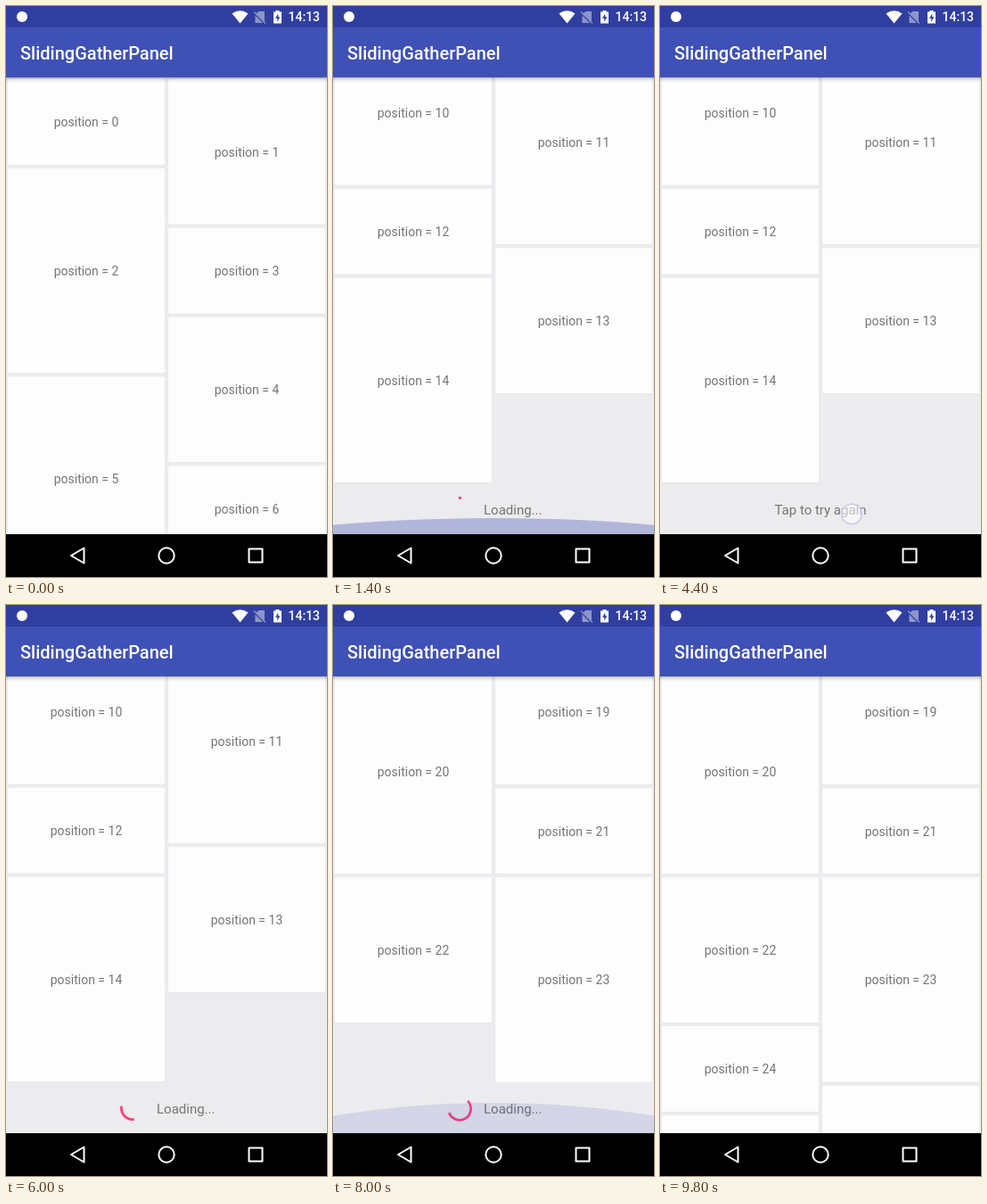
Write an HTML page that moves like this. It is 360 px wide and 640 px high and loops after 9900 ms.

```html
<!DOCTYPE html>
<html lang="en">
<head>
<meta charset="utf-8">
<title>Paged list</title>
<style>
  html, body { margin: 0; width: 100%; height: 100%; overflow: hidden; background: #000; }
  svg { display: block; width: 100%; height: 100%; }
  text { font-family: Roboto, sans-serif; font-size: 14px; fill: #757575; }
  .mid { text-anchor: middle; }
  .foot { font-size: 15px; }
  .title { font-size: 20px; font-weight: 500; fill: #fff; }
  .clock { font-weight: 500; fill: #fff; }
  .nav { fill: none; stroke: #fff; stroke-width: 2; stroke-linejoin: round; }
</style>
</head>
<body>
<svg viewBox="0 0 360 640">
  <defs>
    <linearGradient id="shade" x2="0" y2="1">
      <stop offset="0" stop-color="#000" stop-opacity=".27"/>
      <stop offset=".4" stop-color="#000" stop-opacity=".09"/>
      <stop offset="1" stop-color="#000" stop-opacity="0"/>
    </linearGradient>
  </defs>
  <rect width="360" height="640" fill="#ecebee"/>

  <g id="list">
    <g id="footer">
      <g id="busy">
        <path id="arc" fill="none" stroke="#ff4081" stroke-width="2.8" stroke-linecap="square"/>
        <text class="foot" x="169" y="33.6">Loading...</text>
      </g>
      <text id="retry" class="foot mid" x="180" y="33.6">Tap to try again</text>
    </g>
  </g>

  <g id="glow"><circle cx="180" cy="-467.7" r="540" fill="#3f51b5"/></g>

  <rect y="80" width="360" height="6" fill="url(#shade)"/>
  <rect width="360" height="80" fill="#3f51b5"/>
  <rect width="360" height="24" fill="#303f9f"/>
  <text class="title" x="16" y="59.5">SlidingGatherPanel</text>

  <circle cx="18" cy="12" r="6" fill="#fff"/>
  <path d="M253.5 8.4Q262.5 2.2 271.5 8.4L262.5 19.4Z" fill="#fff"/>
  <g opacity=".45">
    <path d="M283.5 6H290V17.5L280.5 8.5ZM279.5 10.5L288 19H279.5Z" fill="#fff"/>
    <path d="M278 6.5L291 19.5" stroke="#fff" stroke-width="1.3"/>
  </g>
  <path d="M302.5 5H306.500V6.400H309V19.500H300V6.400H302.500Z" fill="#fff"/>
  <path d="M305.300 8.500L302 13.800H304.200V17.700L307.400 12.300H305.300Z" fill="#303f9f"/>
  <text class="clock" x="316.500" y="17.200">14:13</text>

  <rect y="592" width="360" height="48"/>
  <path class="nav" d="M73 616L87.500 607.500V624.500Z"/>
  <circle class="nav" cx="180" cy="616" r="8.700"/>
  <rect class="nav" x="272.500" y="608.500" width="15" height="15"/>

  <circle id="touch" r="11.300" fill="#fff" fill-opacity=".55" stroke="#cfc9e8" stroke-width="1.600"/>
</svg>
<script>
const LOOP = 9900, STEP = 100;
const LOADED = [-1000, 6400, 9200];       // when each page of cards arrives
const FIRST = [0, 15, 24, 28];            // first card of each page
const END = [1380, 6340 / 3];             // footer tops in list space
const SCROLL = [
  [900, 0], [1000, 20], [1100, 110], [1200, 370], [1300, 630], [1376, 844],
  [7200, 844], [7300, 868], [7400, 952], [7500, 1165], [7600, 1385], [7700, 1576.67]
];
const SPINS = [[1395, 1.1], [4470, 1], [7700, 1]];   // start, rate
const FAIL = [3400, 4470];
const GLOWS = [{ at: 1376, rise: 180, peak: .5 }, { at: 7700, rise: 111, peak: .3 }];
const DRAGS = [{ at: 900, x: 300, y: 588 }, { at: 7200, x: 310, y: 493 }];
const TAP = { at: 4400, x: 215, y: 569.5 };

const $ = id => document.getElementById(id);
const clamp = v => Math.min(1, Math.max(0, v));
const decel = u => 1 - (1 - clamp(u)) ** 2;
const show = (el, on) => el.setAttribute('display', on ? 'inline' : 'none');

function add(parent, tag, attrs, text = '') {
  const el = document.createElementNS('http://www.w3.org/2000/svg', tag);
  for (const k in attrs) el.setAttribute(k, attrs[k]);
  el.textContent = text;
  return parent.appendChild(el);
}

// Staggered two-column layout: each card goes to the shorter column.
const pages = LOADED.map(() => add($('list'), 'g', {}));
const bottom = [80, 80];
for (let i = 0; i < FIRST[3]; i++) {
  const col = bottom[1] < bottom[0] - .01 ? 1 : 0;
  const h = 100 + (i % 3) * 200 / 3, x = col * 180, y = bottom[col];
  const page = pages[i < FIRST[1] ? 0 : i < FIRST[2] ? 1 : 2];
  add(page, 'rect', { x: x + 1.7, y: y + 2, width: 176.6, height: h - 3.4, rx: 1.5, fill: '#e3e2e6' });
  add(page, 'rect', { x: x + 2, y: y + 2, width: 176, height: h - 4, rx: 1.5, fill: '#fefdfe' });
  add(page, 'text', { x: x + 90, y: y + h / 2 + 5.3, class: 'mid' }, 'position = ' + i);
  bottom[col] += h;
}

function scrollAt(t) {
  let [t0, s0] = SCROLL[0];
  for (const [t1, s1] of SCROLL) {
    if (t < t1) return s0 + (s1 - s0) * clamp((t - t0) / (t1 - t0));
    [t0, s0] = [t1, s1];
  }
  return s0;
}

// Ease along a cubic from (0,0) to (1,1) with control heights 0 and 1.
function ease(u, x1, x2) {
  let lo = 0, hi = 1;
  for (let i = 0; i < 22; i++) {
    const s = (lo + hi) / 2, r = 1 - s;
    if (3 * r * r * s * x1 + 3 * r * s * s * x2 + s ** 3 < u) lo = s; else hi = s;
  }
  return lo * lo * (3 - 2 * lo);
}

function arcPath(dt) {
  const p = dt % 1333 / 1333;
  const from = p > .5 ? .75 * ease(2 * p - 1, .7, .6) : 0;
  const to = p < .5 ? .75 * ease(2 * p, .4, .2) : .75;
  const turn = p * .25 + dt * 2 / 6665 - .25;
  const point = f => {
    const a = (f + turn) * 2 * Math.PI;
    return `${142 + 12.6 * Math.cos(a)} ${28 + 12.6 * Math.sin(a)}`;
  };
  const end = Math.max(to, from + .003);
  return `M${point(from)}A12.6 12.6 0 ${end - from > .5 ? 1 : 0} 1 ${point(end)}`;
}

function drawGlow(t) {
  const g = GLOWS.find(g => t >= g.at && t < g.at + g.rise + 600);
  show($('glow'), g);
  if (!g) return;
  const e = t - g.at, rising = e < g.rise;
  const k = rising ? decel(e / g.rise) : 1 - decel((e - g.rise) / 600);
  $('glow').setAttribute('transform', `translate(0 592) scale(1 ${-k})`);
  $('glow').setAttribute('opacity', rising ? .3 + (g.peak - .3) * k : g.peak * k);
}

function drawTouch(t, scroll) {
  const drag = DRAGS.find(d => t >= d.at && t <= d.at + 200);
  const tap = t >= TAP.at && t <= TAP.at + 100;
  show($('touch'), drag || tap);
  if (!drag && !tap) return;
  const { at, x, y } = drag || TAP;
  const moved = drag ? scroll - scrollAt(at) : 0;
  $('touch').setAttribute('cx', x);
  $('touch').setAttribute('cy', y - moved - (moved ? 8 : 0));
}

function draw(t) {
  const scroll = scrollAt(t);
  $('list').setAttribute('transform', `translate(0 ${-scroll})`);
  pages.forEach((p, i) => p.setAttribute('opacity', t < LOADED[i] ? 0 : clamp(.5 + (t - LOADED[i]) / 200)));

  show($('footer'), t < LOADED[2]);
  $('footer').setAttribute('transform', `translate(0 ${END[t < LOADED[1] ? 0 : 1]})`);
  const failed = t >= FAIL[0] && t < FAIL[1];
  show($('busy'), !failed);
  show($('retry'), failed);
  const [start, rate] = SPINS.filter(s => t >= s[0]).pop() || [t, 1];
  $('arc').setAttribute('d', arcPath((t - start) * rate));

  drawGlow(t);
  drawTouch(t, scroll);
}

function tick() {
  const t = performance.now() % LOOP;
  draw(Math.floor(t / STEP) * STEP);
  requestAnimationFrame(tick);
}
tick();
</script>
</body>
</html>
```
